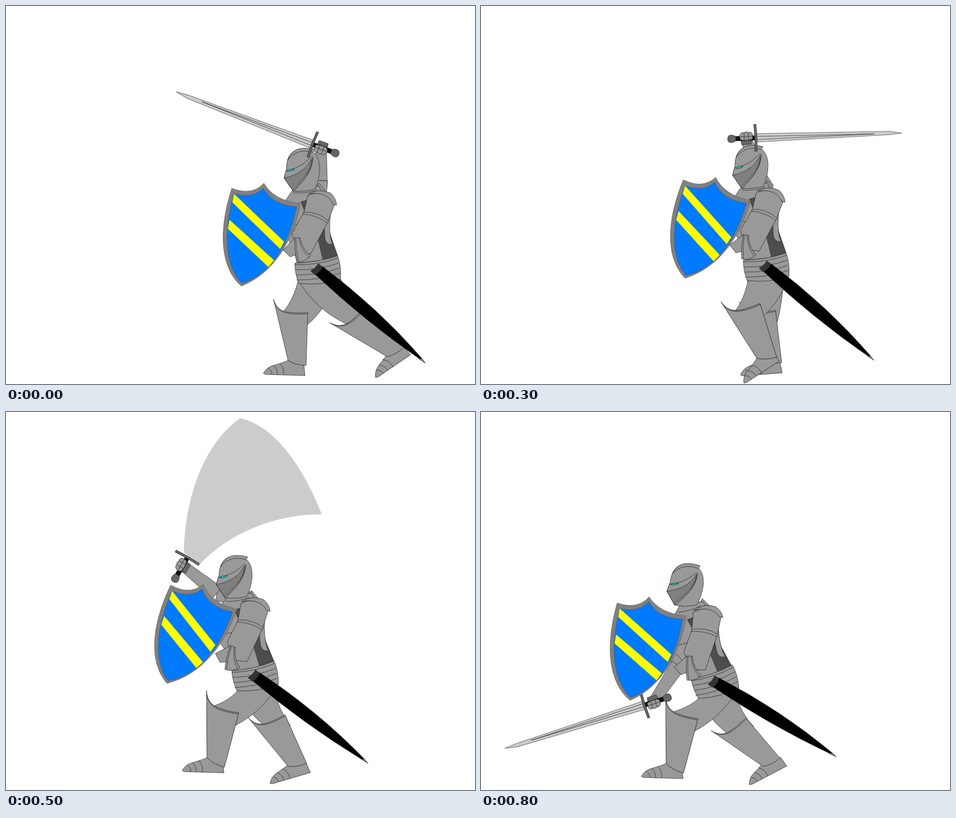
Write an HTML page with a canvas that moves like this. It is 833 by 672 pixels and loops after 1.4 s.

```html
<!DOCTYPE html>
<html lang="en">
<head>
<meta charset="utf-8">
<title>Knight attack</title>
<style>
  html, body { margin: 0; width: 100%; height: 100%; overflow: hidden; background: #fff; }
  canvas { display: block; }
</style>
</head>
<body>
<canvas id="stage" width="833" height="672"></canvas>
<script>
const ctx = document.getElementById('stage').getContext('2d');
const STEP = 100, LOOP = 1400, LAST = 8;
const STEEL = '#999', DARK = '#4d4d4d', MID = '#808080', BLADE = '#ccc';

const clamp = v => Math.max(0, Math.min(1, v));
const rad = deg => deg * Math.PI / 180;

// Key points as [step, ...values], eased out between neighbours.
const swing = [   // hand x, y, blade degrees
  [0, 560, 252, -159.3], [2, 552, 245, 1], [4, 438, 231, -3.7],
  [5, 314, 273, -60], [6, 249, 409, -139], [8, 306, 516, -197.7],
];
const stride = [  // knee from hip x, y, shin and foot degrees
  [0, 20, 105, -46, -36], [2, -47, 128, -60, -73], [4, -96, 50, -2, -19], [5, -87, 37, 13, 0],
];
const swooshes = {
  5: 'M316 250C318 150 352 56 416 11C478 25 528 98 561 182C480 181 396 215 345 270Z',
  6: 'M330 142Q270 140 213 146C120 156 50 190 18 250C54 326 150 382 236 402L256 360C264 290 282 196 330 142Z',
};

function track(keys, step) {
  const next = keys.findIndex(k => k[0] > step);
  if (next < 0) return keys.at(-1).slice(1);
  const a = keys[next - 1], b = keys[next];
  const mix = Math.sin((step - a[0]) / (b[0] - a[0]) * Math.PI / 2);
  return a.slice(1).map((v, i) => v + (b[i + 1] - v) * mix);
}

function shape(d, fill = STEEL, line = '#222') {
  const path = new Path2D(d);
  if (fill) { ctx.fillStyle = fill; ctx.fill(path); }
  if (line) { ctx.strokeStyle = line; ctx.stroke(path); }
}
const seams = d => shape(d, null);

// Draws with the point (px, py) moved to (x, y) and turned by deg.
function at([x, y, deg = 0], draw, px = 0, py = 0, size = 1) {
  ctx.save();
  ctx.translate(x, y);
  ctx.rotate(rad(deg));
  ctx.scale(size, size);
  ctx.translate(-px, -py);
  draw();
  ctx.restore();
}

function place([x, y, deg], px, py) {
  const c = Math.cos(rad(deg)), s = Math.sin(rad(deg));
  return [x + px * c - py * s, y + px * s + py * c];
}

function limb(a, b, wa, wb) {
  const len = Math.hypot(b[0] - a[0], b[1] - a[1]);
  const nx = (a[1] - b[1]) / len / 2, ny = (b[0] - a[0]) / len / 2;
  shape(`M${a[0] + nx * wa} ${a[1] + ny * wa}L${b[0] + nx * wb} ${b[1] + ny * wb}` +
        `L${b[0] - nx * wb} ${b[1] - ny * wb}L${a[0] - nx * wa} ${a[1] - ny * wa}Z`);
}

function leg(knee, footTurn, hip, left, right, size) {
  const h1 = place(hip, ...left), h2 = place(hip, ...right);
  const k1 = place(knee, 18 * size, 22 * size), k2 = place(knee, 61 * size, 45 * size);
  const bend = (h, k) => [h[0] * .65 + k[0] * .35, h[1] * .35 + k[1] * .65];
  shape(`M${h1}Q${bend(h1, k1)} ${k1}L${k2}Q${bend(h2, k2)} ${h2}Z`);

  const tuck = Math.max(0, footTurn - knee[2]) * .55;   // raised heel
  at([...place(knee, 26 * size, 109 * size), footTurn], () => {
    shape('M0 0Q-8 4-26 9Q-38 12-44 23L-40 25L30 27L28 8Q12 8 0 0Z');
    seams('M-35 14Q-28 18-29 25M-26 9Q-18 16-19 25M-15 5Q-6 14-8 26');
  }, -tuck, tuck);
  at(knee, () => {
    shape('M0 0C6 20 17 27 61 24L58 118Q40 118 26 109Z');
    seams('M2 6C8 22 20 29 61 26');
  }, 0, 0, size);
}

function torso() {
  shape('M550 390L572 395L589 444L558 453Z', DARK);
  shape('M549 326L556 315L567 330Z');
  shape('M497 345Q505 332 515 320L556 320L577 365Q556 400 553 410Q558 430 563 452L517 457Q510 420 490 400Z');
  seams('M500 390L526 387M510 332Q530 334 552 327');
  shape('M553 410Q557 402 566 396L580 420L588 444L563 452Q558 430 553 410Z', DARK, null);
  shape('M578 345L575 385Q574 410 580 424Q566 425 566 408L565 375Z');
  shape('M524 348L540 344L530 364Z', DARK);
}

function helmet() {
  shape('M494 306L498 290C498 265 510 254 527 254C548 254 557 268 557 290Q556 310 549 325Q530 331 510 329Z');
  shape('M500 274Q508 254 526 253Q538 252 548 255L545 260Q518 252 500 274Z');
  shape('M497 293Q522 288 537 273Q544 265 545 270Q544 289 531 306L511 329L494 306Z');
  shape('M494 306Q530 298 543 271Q543 288 530 304L509 327Z', MID);
  seams('M545 270Q543 292 528 310L511 329');
  shape('M499 293Q505 289 513 290Q509 294 500 294Z', '#00d0d8');
}

function sword(blade) {
  if (blade) {
    shape('M18-7.5L255-2L276 2L255 4L18 7.5Z', BLADE, '#444');
    seams('M18-2.5L227 1.5L18 3');
  }
  shape('M-10 2H9L8 11H-9Z', '#666');
  shape('M-20-4H15V4H-20Z', '#111');
  shape('M-19-4Q-27-9-32-5Q-35 0-32 5Q-27 9-19 4Z', '#666');
  shape('M14-24H18L19 0L18 24H14L15 0Z', '#666');
  shape('M-11-7Q-8-12-4-10Q0-13 4-10Q9-12 11-7L11 1Q6 5-9 3Q-14-1-11-7Z');
  seams('M-11-3H10M-4-10V3M4-10V3');
}

function frontArm(cuff) {
  shape('M536 337L529 367L508 404L518 437L541 441L571 385L584 352Q566 324 536 337Z');
  shape('M529 366Q555 366 573 382L571 386Q550 371 528 370Z');
  shape('M537 334Q558 323 577 333Q587 343 587 354L581 352Q570 329 537 334Z');
  at([516, 412, cuff], () => {
    shape('M513 412L492 434L505 446L519 440Z');
    shape('M513 412Q512 436 517 455Q531 456 541 444Q527 434 522 412Z');
    seams('M515 413Q515 436 520 454M520 412Q524 434 538 447');
  }, 516, 412);
}

function shield() {
  shape('M401 324Q437 338 458 315Q476 346 523 351C511 414 478 474 418 498C381 466 376 401 401 324Z', MID, '#666');
  shape('M405 334Q439 343 457 324Q473 354 516 357C504 418 474 477 419 493C389 463 385 403 405 334Z', '#007bff', '#555');
  shape('M405 334L494 419L487 432L402 349ZM397 380L476 452L466 464L394 396Z', '#ff0', null);
}

function waist() {
  shape('M513 457Q555 456 589 444Q596 462 594 485Q560 498 520 493Q513 475 513 457Z');
  for (let i = 0; i < 4; i++) {
    const y = 460 + i * 9;
    seams(`M${513 + i} ${y}Q555 ${y + 1} ${590 + i} ${y - 12}`);
  }
}

function scabbard() {
  shape('M562 463Q662 538 739 627L734 627Q636 559 549 477Z', '#000');
  shape('M555 458Q549 467 541 471L549 478Q558 473 562 464Z', '#333');
  shape('M739 627L745 635L733 627Z', MID);
}

function draw(step) {
  const walk = clamp(step / 4), lunge = clamp(step / 4 - 1);
  const sink = 1 - (1 - lunge) ** 1.5;
  const lean = -9.3 * sink;
  const x = 555 - 90 * walk ** 2.25 - 50 * (1 - (1 - lunge) ** 2);
  const y = 458 - 5 * clamp(step / 2) + 16 * sink;
  const hip = [x, y, lean], chest = [x, y + 4 * sink, lean];

  const [headX, headY] = place(hip, -61, -152);
  const head = [headX, headY + lean * 1.1, lean * -.65];
  const raise = 9 * clamp(step / 2 - 1) - 11 * sink ** 2;
  const guard = [x - 154 + 1.2 * raise + 1.8 * lean, y - 134 - 2.2 * raise, raise];

  const hand = track(swing, step), shoulder = place(chest, 0, -126);
  const elbow = [(hand[0] + shoulder[0]) / 2, (hand[1] + shoulder[1]) / 2 + 18];
  const [kneeX, kneeY, shin, foot] = track(stride, step);
  const farShin = -17 * clamp(step / 2 - 1) - 25 * sink;
  const farKnee = [...place([501, 630, farShin], -26, -109), farShin];   // planted ankle
  const swoosh = swooshes[step];

  ctx.fillStyle = '#fff';
  ctx.fillRect(0, 0, 833, 672);
  ctx.lineWidth = .7;
  if (swoosh) shape(swoosh, BLADE, null);

  limb(shoulder, elbow, 28, 28);
  limb(hand, elbow, 18, 26);
  leg(farKnee, farShin * .7, hip, [-35, 27], [30, 32], 1);
  leg([x + kneeX, y + kneeY, shin], foot, hip, [-33, 34], [39, 27], 1.06);
  at(chest, torso, 555, 458);
  at(head, helmet, 494, 306);
  at(hand, () => sword(!swoosh));
  at(hip, waist, 555, 458);
  at(chest, () => frontArm(2 * (raise - lean)), 555, 458);
  at(guard, shield, 401, 324);
  at(hip, scabbard, 555, 458);
}

function tick() {
  draw(Math.min(LAST, Math.floor(performance.now() % LOOP / STEP)));
  requestAnimationFrame(tick);
}
tick();
</script>
</body>
</html>
```
